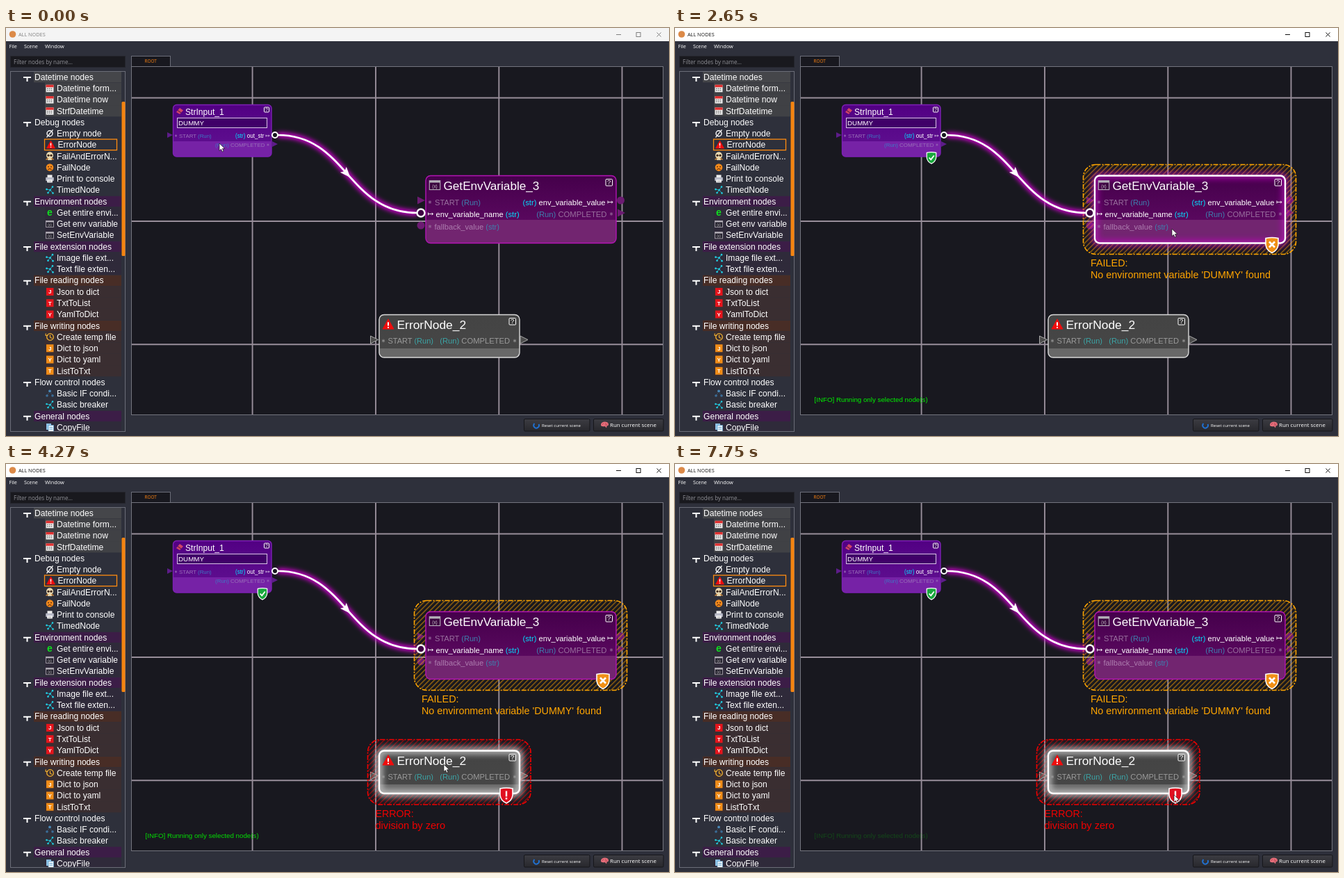
Animation of 954 by 587 pixels, one loop 8000 ms. Source, as an HTML page:

```html
<!DOCTYPE html>
<html lang="en">
<head>
<meta charset="utf-8">
<title>Node editor</title>
<style>
html, body { margin: 0; width: 100%; height: 100%; overflow: hidden; background: #2e303b; }
svg { display: block; width: 100vw; height: 100vh; }
text { font-family: "Liberation Sans", Arial, sans-serif; white-space: pre; }
.ui { font-family: "Open Sans", "Noto Sans", sans-serif; }
</style>
</head>
<body>
<svg id="stage" viewBox="0 0 954 587"></svg>
<script>
const LOOP = 8000;
const CYAN = '#00e1ff', ORANGE = '#ffa500', RED = '#f00000';

const rect = (x, y, w, h, fill, more = '') =>
  `<rect x="${x}" y="${y}" width="${w}" height="${h}" fill="${fill}" ${more}/>`;
const path = (d, stroke, width = 1, more = '') =>
  `<path d="${d}" fill="none" stroke="${stroke}" stroke-width="${width}" ${more}/>`;
const fillPath = (d, fill, more = '') => `<path d="${d}" fill="${fill}" ${more}/>`;
const dot = (x, y, r, fill, more = '') => `<circle cx="${x}" cy="${y}" r="${r}" fill="${fill}" ${more}/>`;
const text = (x, y, s, size, fill = '#fff', more = '') =>
  `<text x="${x}" y="${y}" font-size="${size}" fill="${fill}" ${more}>${s}</text>`;
const ui = (x, y, s, size, fill, more = '') => text(x, y, s, size, fill, 'class="ui" ' + more);
const span = (s, fill) => `<tspan fill="${fill}">${s}</tspan>`;
const group = (id, body, more = '') => `<g id="${id}" ${more}>${body}</g>`;
const move = (x, y, body, scale = 1) => `<g transform="translate(${x} ${y}) scale(${scale})">${body}</g>`;
const fade = (id, top, bottom) =>
  `<linearGradient id="${id}" x2="0" y2="1"><stop stop-color="${top}"/><stop offset="1" stop-color="${bottom}"/></linearGradient>`;

/* Sidebar icons, centred on 0,0 */
const letter = (c, bg) => rect(-5, -5.5, 10.5, 11, bg) +
  text(0.2, 3, c, 8, '#fff', 'font-weight="bold" text-anchor="middle"');
const warning = fillPath('M0 -5.8L6 5H-6Z', '#f00c0c', 'stroke="#f00c0c" stroke-width=".8" stroke-linejoin="round"') +
  path('M0 -2.5V1.5M0 2.7V4', '#fff', 1.5);
const envWindow = rect(-5.5, -4.5, 11, 9.2, '#111', 'fill-opacity=".25" stroke="#b4b0b8" stroke-width=".8"') +
  rect(-5.5, -4.5, 11, 2, '#b4b0b8') + text(0, 3.2, '(x)', 4.6, '#ccc', 'text-anchor="middle"');
const icons = {
  cal: rect(-5.5, -5, 11, 10.5, '#eee') + rect(-5.5, -5, 11, 3.5, '#e03030') +
    path('M-4 0.5H4.5M-4 3H4.5', '#777', 1.4, 'stroke-dasharray="1.6 1.2"'),
  empty: dot(0, 0, 4, 'none', 'stroke="#fff" stroke-width="1.4"') + path('M-4.5 5.5L4.5 -5.5', '#fff', 1.3),
  warn: warning,
  skull: dot(0, -1, 5, '#e8d8b0') + rect(-3, 2, 6, 3.8, '#e8d8b0') +
    dot(-2, -1, 1.6, '#3a2518') + dot(2, -1, 1.6, '#3a2518') + path('M-5.5 5L-2 3M5.5 5L2 3', '#d89040', 1.6),
  sad: dot(0, 0, 5.3, '#f28a1c') + dot(-2, -1, 0.9, '#50200a') + dot(2, -1, 0.9, '#50200a') +
    path('M-2.5 3.2Q0 0.5 2.5 3.2', '#50200a', 1.1),
  print: rect(-3.5, -5.5, 7, 4, '#eee') + rect(-5.8, -2, 11.6, 5, '#b9bbc8') + rect(-3.8, 1.5, 7.6, 4, '#fff') +
    path('M-2.5 3.5H2.5', '#777', 0.8),
  mol: path('M-4.5 -1L0.5 0L4 -4.5M0.5 0L4.5 4.5M0.5 0L-2.5 4', '#20b8cc', 0.9) +
    [[-4.5, -1], [0.5, 0], [4, -4.5], [4.5, 4.5], [-2.5, 4]].map(p => dot(...p, 1.3, '#22cfe2')).join(''),
  e: text(0, 4, 'e', 14, '#10e020', 'font-weight="bold" text-anchor="middle"'),
  env: envWindow,
  clock: dot(0.5, 0, 4.8, 'none', 'stroke="#f0b030" stroke-width="1.3"') +
    path('M0.5 -3V0.5L3 2M-5.8 -5V-2H-2.5', '#f0b030', 1.2),
  cond: path('M0 -3L-4 3M0 -3L4 3', '#456a8c', 0.8, 'stroke-dasharray="1.5 1"') +
    dot(0, -3.5, 1.9, '#4a88b8') + dot(-4, 3.2, 1.8, '#3b6d98') + dot(4, 3.2, 1.8, '#3b6d98'),
  copy: rect(-5, -5.5, 7, 9, '#8fc4e8') + rect(-2, -3, 7.5, 8.8, '#e8f4fc', 'stroke="#5a9cc8" stroke-width="0.7"') +
    path('M-0.5 0H4M-0.5 2.5H4', '#5a9cc8', 0.9),
  J: letter('J', '#e5141c'), T: letter('T', '#e5141c'), Y: letter('Y', '#e5141c'),
  j: letter('J', '#f08c18'), y: letter('Y', '#f08c18'), t: letter('T', '#f08c18')
};

/* Category, header tint, child tint, children */
const tree = [
  ['Datetime nodes', '#45464a', '#404145', 'cal:Datetime form...|cal:Datetime now|cal:StrfDatetime'],
  ['Debug nodes', '', '', 'empty:Empty node|warn:ErrorNode|skull:FailAndErrorN...|sad:FailNode|print:Print to console|mol:TimedNode'],
  ['Environment nodes', '#3c1d47', '#2f2a3a', 'e:Get entire envi...|env:Get env variable|env:SetEnvVariable'],
  ['File extension nodes', '#3c1d47', '#2f2a3a', 'mol:Image file ext...|mol:Text file exten...'],
  ['File reading nodes', '#482d26', '#3a2e31', 'J:Json to dict|T:TxtToList|Y:YamlToDict'],
  ['File writing nodes', '#482d26', '#3a2e31', 'clock:Create temp file|j:Dict to json|y:Dict to yaml|t:ListToTxt'],
  ['Flow control nodes', '', '', 'cond:Basic IF condi...|mol:Basic breaker'],
  ['General nodes', '#3c1d47', '#2f2a3a', 'copy:CopyFile']
];
function sidebar() {
  const step = 16.26;
  let y = 70.5, out = '';
  for (const [name, tint, childTint, kids] of tree) {
    if (tint) out += rect(40, y - 7.5, 126, step - 1, tint);
    out += path(`M25 ${y + 0.5}H36M30.5 ${y + 0.5}V${y + 6.5}`, '#fff', 2) + text(41, y + 4.3, name, 12.1);
    for (const kid of kids.split('|')) {
      const [icon, label] = kid.split(':');
      y += step;
      if (childTint) out += rect(56, y - 8.2, 110, step, childTint);
      const picked = label === 'ErrorNode';
      if (picked) out += rect(55.5, y - 8, 104, 15.6, 'none', 'stroke="#ff8c10" stroke-width="1.3"');
      out += move(picked ? 64.5 : 63, y, icons[icon]) + text(picked ? 74.5 : 73, y + 4.3, label, 12.1);
    }
    y += step;
  }
  return rect(6.5, 62.5, 165, 518, 'none', 'stroke="#6b6d78"') +
    `<g clip-path="url(#list)">${out}</g>` + rect(166.5, 106, 5, 222, '#f58410', 'rx="1.5"');
}

const button = (x, w) => rect(x, 562.5, w, 17.5, 'url(#button)', 'stroke="#16161a" rx="1.5"');

function chrome() {
  return [rect(0, 0, 954, 587, '#2e303b'), rect(0, 0, 954, 19, '#f4f4f4', 'id="bar"'),
    dot(9.5, 9, 4.8, '#dc8a48'),
    group('caption', ui(18, 12, 'ALL NODES', 7.3, 'currentColor') +
      path('M878 9.5H885M936.5 6.5L942.5 12.5M942.5 6.5L936.5 12.5', 'currentColor') +
      rect(907, 6.5, 6, 6, 'none', 'stroke="currentColor"')),
    ui(4.5, 29, 'File', 7.2, '#fff'), ui(26, 29, 'Scene', 7.2, '#fff'), ui(56, 29, 'Window', 7.4, '#fff'),
    rect(6.5, 40.5, 165, 16, '#19191e', 'stroke="#24252c"'), ui(11, 51.5, 'Filter nodes by name...', 8.05, '#8f9096'),
    sidebar(),
    rect(180.5, 40.5, 56, 15, '#18181f', 'stroke="#6b6d78"'), ui(199.5, 50, 'ROOT', 6.4, '#ff8410'),
    rect(180.5, 55.5, 765, 501, '#18181f'),
    path('M354.6 56V556M532 56V556M709.3 56V556M886.5 56V556M181 100.5H945M181 278H945M181 455.3H945', '#988e9a', 1.9),
    rect(180.5, 55.5, 765, 501, 'none', 'stroke="#74757f"'),
    fade('button', '#3c3c42', '#28282d'),
    button(745.5, 94.5), path('M760.5 569A3.8 3.8 0 1 0 766.5 570', '#2070d0', 2),
    ui(771, 573.7, 'Reset current scene', 6.1, '#fff'),
    button(845.5, 100.5),
    fillPath('M856 571q0-4 5-4.5q6 0 6 4q0 2-2.5 2l-.5 3l-2-2.5q-6 1-6-2Z', '#e8707c'),
    path('M859 568q1 2-1 3M862 568q2 2 0 4M865 569l-1 3', '#a83848', 0.7),
    ui(869, 574.3, 'Run current scene', 7.9, '#fff')].join('');
}

/* Node parts */
const star = (x, y, c, s = 1) => move(x, y, path('M0 -2.4V2.4M-2.1 -1.2L2.1 1.2M-2.1 1.2L2.1 -1.2', c, 0.8), s);
const mapsTo = (x, y, s = 1) => move(x, y, path('M0 -2V2M0 0H7M5.2 -1.8L7 0L5.2 1.8', '#fff', 0.9), s);
const tri = (x, y, w, fill, more) => fillPath(`M${x} ${y - w / 2}L${x + w} ${y}L${x} ${y + w / 2}Z`, fill, more);
const help = (x, y, w, size) => rect(x, y, w, w, '#111', 'fill-opacity=".25" stroke="#fff" rx="1"') +
  text(x + w / 2, y + w * 0.82, '?', size, '#fff', 'text-anchor="middle"');

function box(id, x, y, w, h, r, split, [top, mid, low, edge, glow, power]) {
  return fade(id + 'Fill', top, mid) +
    `<clipPath id="${id}Clip">${rect(x, y, w, h, '#000', `rx="${r}"`)}</clipPath>` +
    `<g clip-path="url(#${id}Clip)">${rect(x, y, w, h, low) + rect(x, y, w, split - y, `url(#${id}Fill)`)}</g>` +
    rect(x, y, w, h, 'none', `rx="${r}" stroke="${edge}" stroke-width="1.4"`) +
    group(id + 'Sel', rect(x, y, w, h, 'none', `rx="${r}" stroke="${glow}" stroke-width="10" opacity="${power}" filter="url(#blur)"`) +
      rect(x, y, w, h, 'none', `rx="${r}" stroke="#fff" stroke-width="2.4"`));
}
const hatch = (id, x, y, w, h, color) =>
  `<pattern id="${id}Hatch" width="5" height="5" patternUnits="userSpaceOnUse" patternTransform="rotate(45)">${rect(0, 0, 1.3, 5, color, 'opacity=".58"')}</pattern>` +
  rect(x, y, w, h, `url(#${id}Hatch)`, `rx="18" stroke="${color}" stroke-width="1.6" stroke-dasharray="7 2 2 2"`);
const shield = (x, y, s, fill, mark) => move(x, y,
  fillPath('M-9 -9.5Q0 -11.5 9 -9.5V0Q8 8 0 11.5Q-8 8 -9 0Z', fill, 'stroke="#fff" stroke-width="1.6"') + mark, s);

function strNode() {
  const port = '#5d1c8a', dim = '#9a70ba', run = '#3d78c4';
  return tri(232, 154, 8, port) + tri(383, 167, 8, port) +
    box('str', 240.5, 110.5, 141.5, 74.5, 5, 163, ['#520083', '#5d0d8e', '#7622a6', '#7d20b4', '#8a14d0', 0.6]) +
    fillPath('M245 121l5-6l5 3.5l-5 5.5Z', '#d04468') + path('M247 118.5l5 3.5', '#64204c', 1.2) +
    text(258, 125.2, 'StrInput_1', 12.1) + help(371.5, 114, 7, 7) +
    rect(246.5, 129.5, 129, 14, '#400068', 'stroke="#d9c4e6"') + text(248, 140.3, 'DUMMY', 9.8) +
    star(244.5, 155, dim, 0.75) + text(249, 158, 'START ' + span('(Run)', run), 7.85, dim) +
    text(371.5, 158, span('(str)', CYAN) + ' out_str', 8.15, '#fff', 'text-anchor="end"') + mapsTo(374, 155, 0.7) +
    text(372.5, 171, span('(Run)', run) + ' COMPLETED', 7.95, dim, 'text-anchor="end"') + star(377, 168, dim, 0.75) +
    group('okBadge', shield(369, 186.5, 0.75, '#18a83c', path('M-4.5 0L-1 3.8L5 -4', '#fff', 2.4)));
}

function envNode() {
  const port = '#6c1b72', dim = '#99709e', run = '#3f7fae';
  return tri(592, 248, 11, port) + dot(884.5, 248, 5.5, port) + tri(880, 266, 11, port) + dot(597, 284, 5.5, port) +
    group('failBox', hatch('fail', 587.5, 196.5, 306, 129, ORANGE)) +
    box('env', 604, 212.5, 274, 97, 7, 276, ['#45004b', '#59085e', '#722570', '#b214b4', '#c00cc0', 0.65]) +
    move(617, 226, envWindow, 1.4) + text(629.5, 233, 'GetEnvVariable_3', 17.15) + help(863, 217.5, 9.5, 9.5) +
    star(610, 250.5, dim) + text(617, 254.5, 'START ' + span('(Run)', run), 11.1, dim) +
    text(862.5, 254.5, span('(str)', CYAN) + ' env_variable_value', 11.15, '#fff', 'text-anchor="end"') + mapsTo(866, 250.5) +
    mapsTo(607.5, 267.5) + text(618.5, 271.7, 'env_variable_name ' + span('(str)', CYAN), 11.15) +
    text(864.5, 271.7, span('(Run)', run) + ' COMPLETED', 11.25, dim, 'text-anchor="end"') + star(871, 267.5, dim) +
    star(610, 285.5, dim) + text(616.5, 289.5, 'fallback_value ' + span('(str)', run), 11.15, '#ac7cae') +
    group('failMsg', shield(859, 312, 1, '#f09018', path('M-4 -4.5L4 3.5M4 -4.5L-4 3.5', '#fff', 2.6)) +
      text(598, 343, 'FAILED:', 14.4, ORANGE) + text(598, 360, "No environment variable 'DUMMY' found", 14.35, ORANGE));
}

function errNode() {
  const line = 'stroke="#a8a8a8"', dim = '#9a9a9a', run = '#3ca4a6';
  return tri(524.5, 448.5, 11, '#4c4c4c', line) + tri(740, 448.5, 11, '#4c4c4c', line) +
    group('errBox', hatch('err', 520.5, 396.5, 234.5, 93.5, RED)) +
    box('err', 537, 412.5, 202, 61.5, 7, 461, ['#444444', '#464646', '#686868', '#d8d8d8', '#d0d0d0', 0.8]) +
    move(550, 426.5, warning, 1.3) + text(562.5, 433, 'ErrorNode_2', 17.4) + help(724, 417.5, 9.5, 9.5) +
    star(543, 450, dim) + text(549.5, 454, 'START ' + span('(Run)', run), 11, dim) +
    text(725, 454, span('(Run)', run) + ' COMPLETED', 11.2, dim, 'text-anchor="end"') + star(732, 450, dim) +
    group('errMsg', shield(720, 476.5, 1, '#e01020', path('M0 -6V2M0 3.5V6', '#fff', 2.4)) +
      text(531.5, 507.5, 'ERROR:', 14.2, RED) + text(531.5, 524.5, 'division by zero', 14.6, RED));
}

function wire() {
  const d = 'M391 154C491 154 491 266 592 266';
  return path(d, '#c800c8', 8, 'filter="url(#soft)"') + path(d, '#fff', 2.7) +
    `<g transform="translate(490 209) rotate(48)">${fillPath('M8 0L-7 -6L-4 0L-7 6Z', '#fff')}</g>` +
    dot(387, 154, 4, '#18181f', 'stroke="#fff" stroke-width="2"') + dot(597, 266, 5.5, '#3d0042', 'stroke="#fff" stroke-width="2.4"');
}

const stage = document.getElementById('stage');
const region = 'filterUnits="userSpaceOnUse" x="180" y="55" width="766" height="501"';
const blur = (id, size) => `<filter id="${id}" ${region}><feGaussianBlur stdDeviation="${size}"/></filter>`;
stage.innerHTML = `<defs>${blur('blur', 4.5)}${blur('soft', 3.2)}` +
  `<clipPath id="list">${rect(7, 63, 164, 517, '#000')}</clipPath></defs>` +
  chrome() + envNode() + errNode() + strNode() + wire() +
  text(200.5, 538, '[INFO] Running only selected node(s)', 9.75, '#00f000', 'id="info"') +
  group('tip', rect(376.5, 192.5, 52, 23, '#2b2d36', 'stroke="#454750"') +
    ui(380, 202, 'SUCCESS!', 7.1, '#00f000') + ui(380, 211.5, 'Exec: 0.0000s', 7, '#00f000')) +
  group('cursor', fillPath('M0 0V10.5L2.5 8.3L4.2 12L6 11.2L4.4 7.6H7.8Z', '#fff', 'stroke="#000" stroke-width=".6"'));

const el = {};
stage.querySelectorAll('[id]').forEach(e => el[e.id] = e);

/* Cursor moves: first change, last change, steps, target */
const moves = [
  [90, 90, 1, 308, 166],
  [1600, 2380, 10, 715, 289],
  [3010, 3280, 4, 639, 441],
  [4270, 4990, 9, 375.5, 184.5],
  [6760, 7480, 9, 713, 471],
  [7570, 7750, 3, 718, 476]
];
const runs = [1240, 2650, 3820];
const ease = p => p * p * (3 - 2 * p);

function cursorAt(t) {
  let x = 307, y = 166;
  for (const [from, to, n, tx, ty] of moves) {
    if (t < from) break;
    const k = n > 1 ? Math.floor((t - from) / ((to - from) / (n - 1)) + 1e-6) : 0;
    const p = ease(Math.min(1, (k + 1) / n));
    x += (tx - x) * p;
    y += (ty - y) * p;
  }
  return [x, y];
}

function draw(t) {
  const show = (id, from, to = LOOP) => { el[id].style.display = t >= from && t < to ? '' : 'none'; };
  const active = t >= 530;
  el.bar.setAttribute('fill', active ? '#fff' : '#f4f4f4');
  el.caption.style.color = active ? '#111' : '#808080';
  show('strSel', 530, 2380);
  show('envSel', 2380, 3550);
  show('errSel', 3550);
  show('okBadge', 1240);
  show('failBox', 2650);
  show('failMsg', 2650);
  show('errBox', 3820);
  show('errMsg', 3820);
  show('tip', 5710, 6760);
  const last = runs.filter(r => r <= t).pop();
  el.info.setAttribute('opacity', last === undefined ? 0 : 1 - (t - last) / 5000);
  el.cursor.setAttribute('transform', `translate(${cursorAt(t)})`);
}

const start = performance.now();
function tick(now) {
  draw(Math.max(0, now - start) % LOOP);
  requestAnimationFrame(tick);
}
draw(0);
requestAnimationFrame(tick);
</script>
</body>
</html>
```
